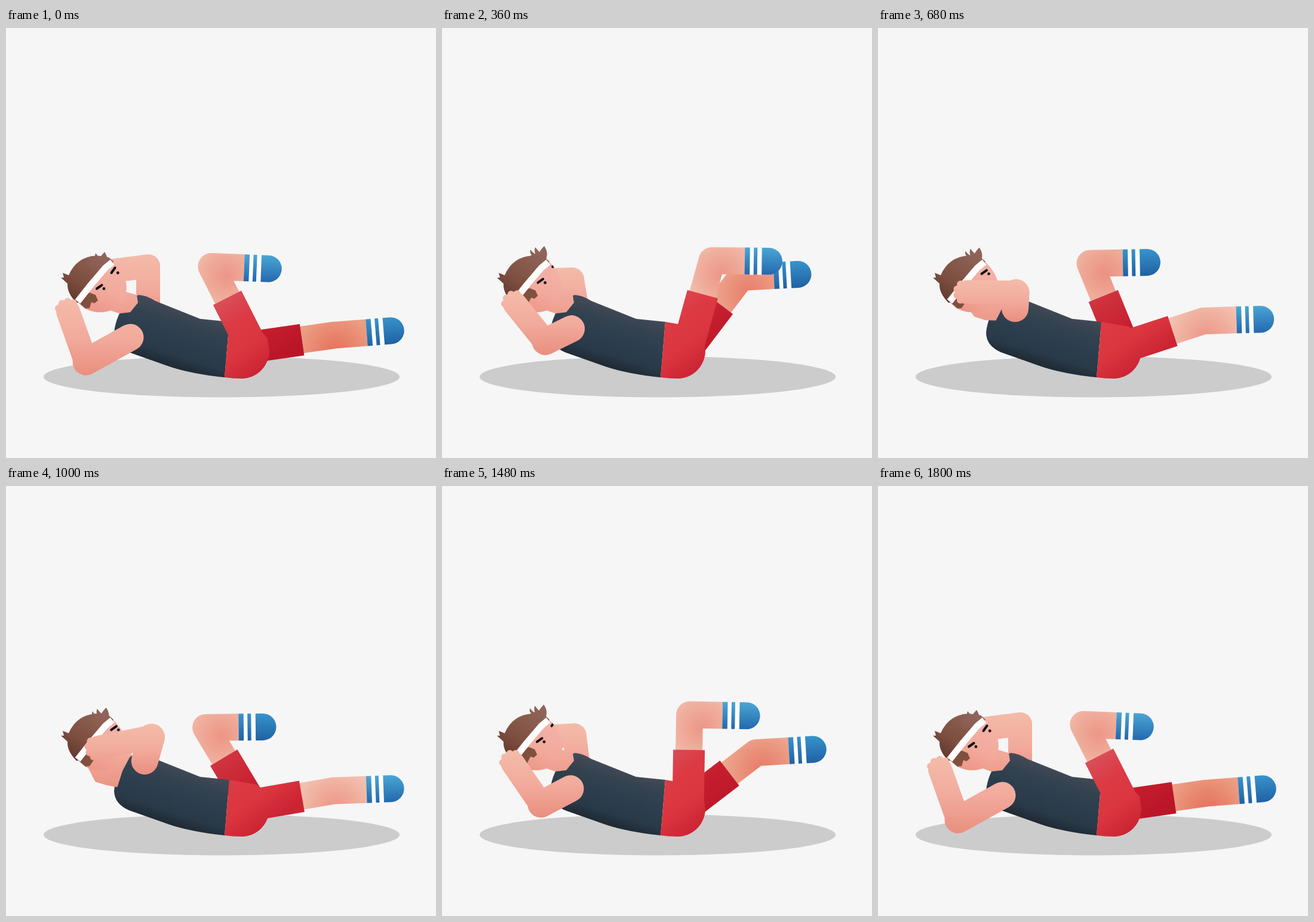
An HTML page with a canvas for the animation above (1840 ms loop, 720 px wide and 720 px high).

```html
<!DOCTYPE html>
<html lang="en">
<head>
<meta charset="utf-8">
<title>Bicycle crunches</title>
<style>
html, body { margin: 0; height: 100%; overflow: hidden; background: #f6f6f6; }
canvas { display: block; width: 100vmin; height: 100vmin; }
</style>
</head>
<body>
<canvas id="stage" width="720" height="720"></canvas>
<script>
const ctx = document.getElementById('stage').getContext('2d');
const LOOP = 1840, CYCLE = 1800, STEP = 40;
const HIP = [412, 534], RAD = Math.PI / 180;

const mix = (a, b, u) => a + (b - a) * u;
const mixPoint = (p, q, u) => p.map((v, i) => mix(v, q[i], u));
const polar = ([x, y], deg, d) => [x + d * Math.cos(deg * RAD), y - d * Math.sin(deg * RAD)];
const poly = points => 'M' + points.map(p => p.join()).join('L') + 'Z';

function shade(g, colors) {
  colors.forEach((c, i) => g.addColorStop(i / (colors.length - 1), c));
  return g;
}
const linear = (x0, y0, x1, y1, ...colors) =>
  shade(ctx.createLinearGradient(x0, y0, x1, y1), colors);

function fill(d, style) {
  ctx.fillStyle = style;
  ctx.fill(new Path2D(d));
}
function dot([x, y], r, style) {
  ctx.fillStyle = style;
  ctx.beginPath();
  ctx.arc(x, y, r, 0, 7);
  ctx.fill();
}
function line(points, width, style, cap = 'round') {
  ctx.beginPath();
  points.forEach(p => ctx.lineTo(...p));
  ctx.lineWidth = width;
  ctx.lineCap = cap;
  ctx.lineJoin = 'round';
  ctx.strokeStyle = style;
  ctx.stroke();
}

function sock([x, y], deg, top, bottom) {
  ctx.save();
  ctx.translate(x, y);
  ctx.rotate(-deg * RAD);
  fill('M0-22.5H40.5A22.5 22.5 0 0 1 40.5 22.5H0Z', linear(0, -22, 0, 22, top, bottom));
  fill('M8.5-23H15V23H8.5ZM21-23H28.5V23H21Z', '#fdfdfd');
  ctx.restore();
}

function leg(thigh, calf, shorts, dim, sockTop, sockBottom) {
  const len = 137 + 14 * Math.min(1, thigh / 80);
  const knee = polar(HIP, thigh, len), ankle = polar(knee, calf, 55);
  const inner = polar(knee, (thigh + calf - 180) / 2, 30);
  const skin = shade(ctx.createRadialGradient(...inner, 2, ...inner, 66),
    [73, 77, 82].map((l, i) => `hsl(${9 + 3 * i}, 73%, ${l - dim}%)`));
  line([polar(HIP, thigh, len / 2), knee, ankle], 45, skin, 'butt');
  sock(ankle, calf, sockTop, sockBottom);
  line([HIP, polar(HIP, thigh, len * .61)], 53, shorts, 'butt');
  dot(HIP, 26.5, shorts);
}

// Moves hand, elbow and shoulder between two poses, the joints sagging midway.
function armPose(from, to, turn, sag) {
  return from.map((p, i) => {
    const [x, y] = mixPoint(p, to[i], turn);
    return [x, y + sag[i] * 4 * turn * (1 - turn)];
  });
}

function arm([hand, elbow, shoulder], width) {
  const ys = [hand[1], elbow[1], shoulder[1]];
  const skin = linear(0, Math.min(...ys) - 20, 0, Math.max(...ys) + 20,
    '#f4bba9', '#f2ab9d', '#ea9080');
  line([hand, elbow], 40, skin);
  line([elbow, shoulder], width, skin);
  const dir = Math.atan2(elbow[1] - hand[1], hand[0] - elbow[0]) / RAD;
  for (let a = -51; a <= 51; a += 34) dot(polar(hand, dir + a, 17), 6, skin);
}

function torso() {
  fill('M374 492L325 487L250 457Q234 447 222 447Q214 450 205 455Q184 480 181 510Q181 532 206 543L274 567Q310 579 366 585Z',
    linear(300, 468, 268, 572, '#474b58', '#33424f', '#2c3e4e', '#293947', '#1b242c'));
}

function neck(turn) {
  const facing = [[162, 466], [195, 440], [219, 447], [221, 460], [208, 476], [190, 478], [172, 472]];
  const away = [[130, 468], [190, 440], [205, 455], [190, 480], [182, 510], [165, 506], [145, 500]];
  fill(poly(facing.map((p, i) => mixPoint(p, away[i], turn ** 6))),
    linear(0, 445, 0, 505, '#f2aa9d', '#ea9583'));
}

function head(turn) {
  const face = 'M176 388Q202 412 202 436Q198 462 182 470Q158 482 133 470L116 455Z';
  fill(face, linear(180, 405, 150, 480, '#f4b0a6', '#f2a99c', '#ec9584'));

  // Sideburn, brows and eyes slide over the face as the head turns.
  const dx = 25 * turn, dy = -29 * turn, ink = '#111';
  const burn = [[140, 443], [150, 447], [154, 456], [148, 461], [143, 459]]
    .map(([x, y]) => [x + dx * .75, y + dy * .75]);
  ctx.save();
  ctx.clip(new Path2D(face));
  fill(poly([[116, 454], ...burn, [140, 469], [130, 470]]), '#80503f');
  ctx.translate(dx, dy);
  for (const [x, y, slope] of [[152, 436.5, 6], [176.5, 410, 8.5]]) {
    line([[x, y], [x + 14.5 - slope, y - slope]], 4, ink);
    dot([x + 12 - slope / 2 + 3, y], 2.4, ink);
  }
  ctx.restore();

  const hair = linear(165, 375, 112, 455, '#90645a', '#875a4c', '#7c4e40', '#633a2e');
  fill('M118 460Q102 444 103 428L92 418L97 418L95 410L105 414Q118 383 152 381L172 384L180 391L120 460Z', hair);
  const lift = 4 * turn * (1 - turn);
  ctx.save();
  ctx.translate(6 * lift + 2 * turn - 6, 8 - 10 * lift - 3 * turn);
  fill('M142 388L150 382Q146 378 148 373Q152 379 156 380Q154 374 156 369Q160 374 163 377Q167 371 171 367Q180 380 172 393L150 400Z', hair);
  ctx.restore();
  line([[178, 392], [166, 402], [143, 429], [120, 458]], 11, '#fdfdfd', 'butt');
}

function draw(t) {
  const swing = Math.cos(t / CYCLE * 2 * Math.PI), turn = (1 - swing) / 2;
  const lagged = deg => Math.cos((t / CYCLE * 360 + deg) * RAD);

  ctx.fillStyle = '#f6f6f6';
  ctx.fillRect(0, 0, 720, 720);
  ctx.fillStyle = '#ccc';
  ctx.beginPath();
  ctx.ellipse(361, 584, 298, 34.5, 0, 0, 7);
  ctx.fill();

  leg(67 - 59 * lagged(4), 2.5 + 2 * swing,
    linear(370, 450, 445, 560, '#d03540', '#c6202f', '#bb1628'), 10 * (1 - turn),
    '#3793cb', '#2062a5');
  arm(armPose([[182, 406], [238, 399], [238, 470]], [[172, 432], [180, 442], [205, 480]],
    turn, [8, 8, 0]), 40);
  torso();

  const red = linear(365, 450, 445, 560, '#d9505a', '#dc3a44', '#db3640', '#cc2433');
  leg(61 + 56 * lagged(4), -2.3 * swing, red, 0, '#4aa5d4', '#2469ae');
  fill('M374 492L366 585Q380 587 395 587A47 47 0 0 0 441 540L438 520L420 500Z', red);

  neck(turn);
  head(turn);
  arm(armPose([[104, 475], [134, 559], [208, 518]], [[156, 437], [247, 414], [233, 458]],
    turn, [0, 18, 7]), 45);
}

function tick(now) {
  draw(Math.floor(now % LOOP / STEP) * STEP % CYCLE);
  requestAnimationFrame(tick);
}
requestAnimationFrame(tick);
</script>
</body>
</html>
```
